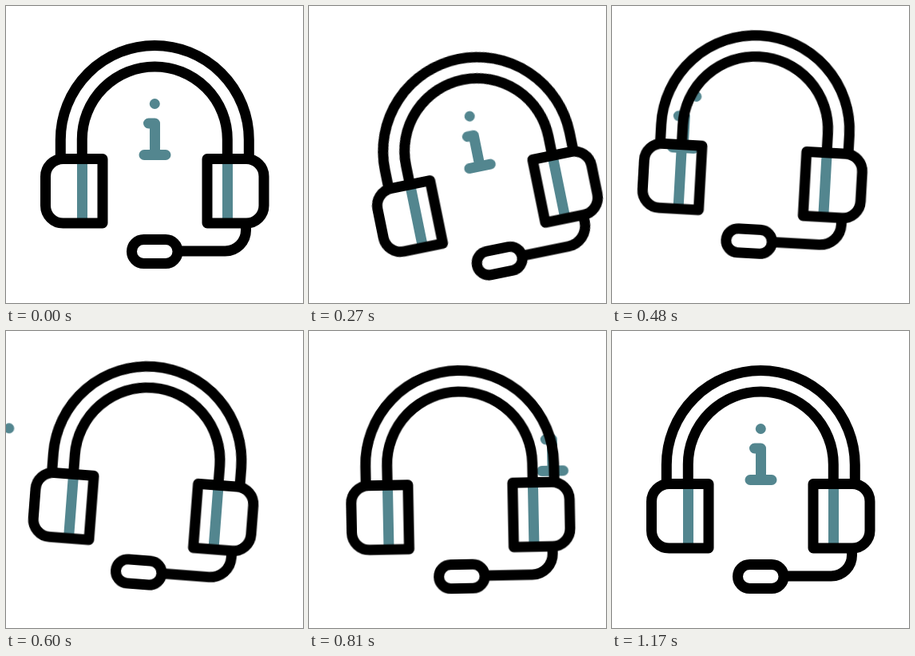
An HTML page for the animation above (1500 ms loop, 372x372 px).

```html
<!DOCTYPE html>
<html lang="en">
<head>
<meta charset="utf-8">
<title>Headset info icon</title>
<style>
  html, body { margin: 0; width: 100%; height: 100%; overflow: hidden; background: #fff; }
  svg { display: block; width: 100%; height: 100%; }
  path, rect { fill: none; stroke: #000; stroke-width: 13; stroke-linecap: round; stroke-linejoin: round; }
  .teal { stroke: #53868f; }
  .flat { stroke-linecap: butt; }
  circle { fill: #53868f; }

  .bob, .tilt, .stem, .dot {
    animation: 1500ms cubic-bezier(.37, 0, .63, 1) infinite;
  }
  .bob { animation-name: bob; }
  .tilt { animation-name: tilt; transform-origin: 186.3px 45px; }
  .stem { animation-name: stem; }
  .dot { animation-name: dot; }

  @keyframes bob {
    0%, 5% { transform: translateY(0); }
    18% { transform: translateY(17px); }
    32% { transform: translateY(-12.5px); }
    46%, 100% { transform: translateY(0); }
  }
  @keyframes tilt {
    0%, 5% { transform: rotate(0deg); }
    20% { transform: rotate(-12deg); }
    35.33% { transform: rotate(5deg); }
    59.67% { transform: rotate(-2deg); }
    76%, 100% { transform: rotate(0deg); }
  }
  /* the letter speeds out on the left and returns from the right, its dot trailing */
  @keyframes stem {
    0% { transform: translate(0, 0); }
    16.73% { transform: translate(0, 0); animation-timing-function: cubic-bezier(.333, 0, .667, .333); }
    42.66% { transform: translate(-255px, 25px); animation-timing-function: step-end; }
    42.67% { transform: translate(213px, -16.6px); animation-timing-function: cubic-bezier(.3, .43, .72, .96); }
    76%, 100% { transform: translate(0, 0); }
  }
  @keyframes dot {
    0% { transform: translate(0, 0); }
    16.73% { transform: translate(0, 0); animation-timing-function: cubic-bezier(.333, 0, .667, .333); }
    42.66% { transform: translate(-217px, 22px); animation-timing-function: step-end; }
    42.67% { transform: translate(367px, -28.7px); animation-timing-function: cubic-bezier(.3, .43, .72, .96); }
    78%, 100% { transform: translate(0, 0); }
  }
</style>
</head>
<body>
<svg viewBox="0 0 372 372">
  <g class="bob"><g class="tilt">
    <path class="stem teal" d="M178.5 147H186.5V186.5M173 186.5H200"/>
    <circle class="dot" cx="186.3" cy="122.5" r="6.5"/>

    <path class="teal flat" d="M95.5 191V272M277.5 191V272"/>
    <path class="flat" d="M68.3 191V167.5A118 118 0 0 1 304.3 167.5V191"/>
    <path class="flat" d="M95.3 191V167A91 91 0 0 1 277.3 167V191"/>
    <path d="M121 191.5V272H71.5A22 22 0 0 1 49.5 250V213.5A22 22 0 0 1 71.5 191.5Z"/>
    <path d="M252 191.5V272H301A22 22 0 0 0 323 250V213.5A22 22 0 0 0 301 191.5Z"/>
    <path class="flat" d="M300.5 272V281A26 26 0 0 1 274.5 307H215"/>
    <rect x="157.5" y="292.5" width="57.5" height="30" rx="15"/>
  </g></g>
</svg>
</body>
</html>
```
